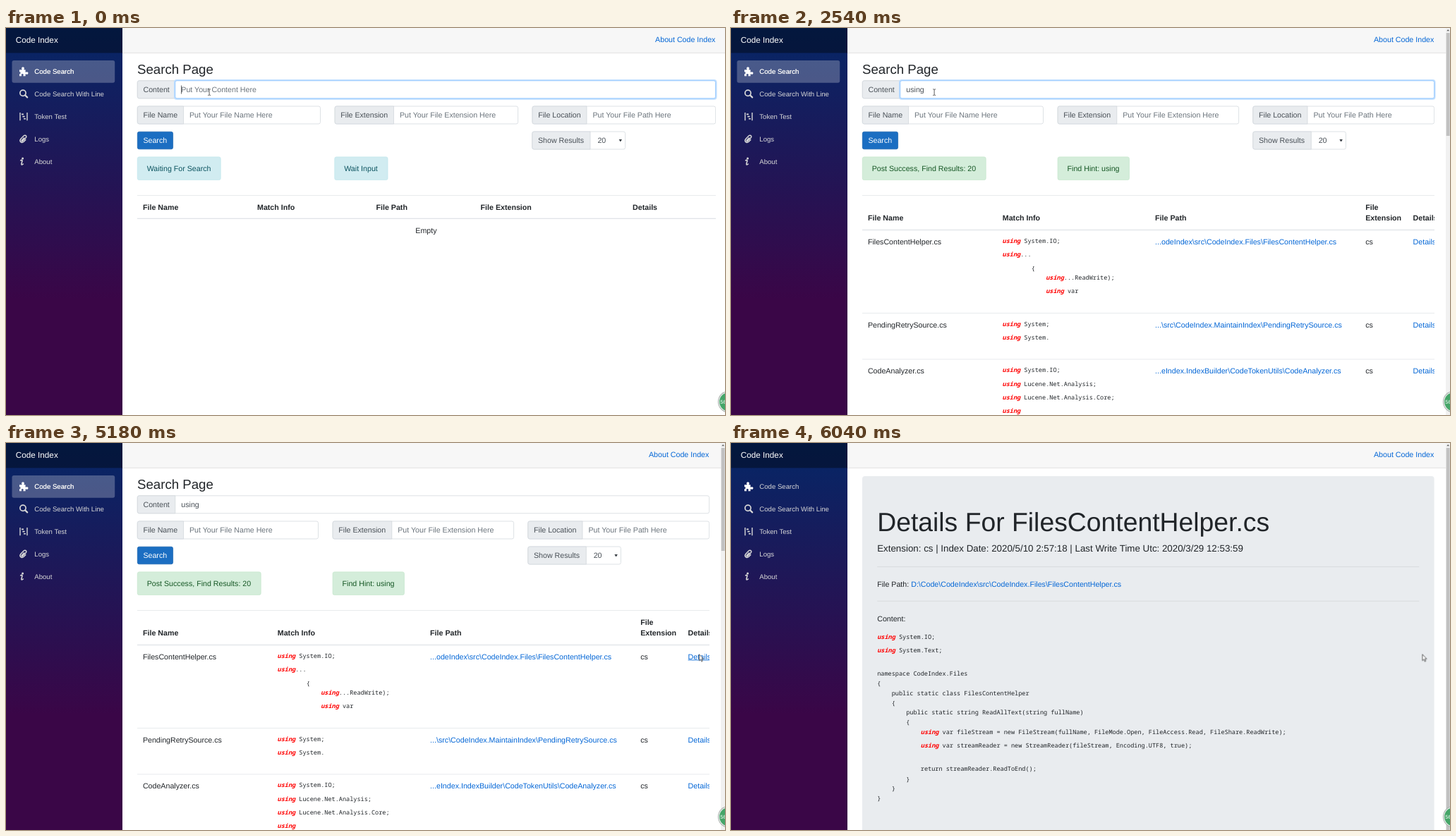
An HTML page for the animation above (7.36 s loop, 1019 by 549 pixels).

```html
<!DOCTYPE html>
<html lang="en">
<head>
<meta charset="utf-8">
<title>Code Index</title>
<style>
html, body { margin: 0; width: 100%; height: 100%; overflow: hidden; background: #fff; }
svg { display: block; width: 1019px; height: 549px; }
text { font: 10.667px "Liberation Sans", Arial, sans-serif; fill: #212529; text-rendering: geometricPrecision; white-space: pre; }
.brand { font-size: 11.73px; fill: #fff; }
.nav { font-size: 9.6px; fill: #d7d7d7; }
.h3 { font-size: 18.667px; }
.h1 { font-size: 37.333px; }
.lead { font-size: 13.333px; }
.b { font-weight: bold; }
.w { fill: #fff; }
.lab { fill: #495057; }
.ph { fill: #6c757d; }
.link { fill: #0366d6; }
.info { fill: #0c5460; }
.good { fill: #155724; }
.code { font: 8.553px "Noto Sans Mono", "DejaVu Sans Mono", monospace; }
.code tspan { font-weight: bold; font-style: italic; fill: #f00; }

.form, .results, .blank, .details, .active, .ph0, .wait, .hint, .focus, .caret, .type, .under, .beam, .arrow {
  animation: 7360ms step-end infinite;
}
.form { animation-name: form; }
.results { animation-name: results; }
.blank { animation-name: blank; }
.details { animation-name: details; }
.active { animation-name: active; }
.ph0 { animation-name: ph0; }
.wait { animation-name: wait; }
.hint { animation-name: hint; }
.focus { animation-name: focus; }
.caret { animation-name: caret; }
.type { animation-name: type; }
.under { animation-name: under; }
.beam { animation-name: beam; }
.arrow { animation-name: arrow, move; }

@keyframes form { 0% { opacity: 1 } 34.511%, 100% { opacity: 0 } }
@keyframes results { 0% { opacity: 0 } 34.511% { opacity: 1 } 71.603%, 100% { opacity: 0 } }
@keyframes blank { 0% { opacity: 0 } 71.603% { opacity: 1 } 72.69%, 100% { opacity: 0 } }
@keyframes details { 0% { opacity: 0 } 72.69%, 100% { opacity: 1 } }
@keyframes active { 0% { opacity: 1 } 71.603%, 100% { opacity: 0 } }
@keyframes ph0 { 0% { opacity: 1 } 10.19%, 100% { opacity: 0 } }
@keyframes wait { 0% { opacity: 1 } 18.886%, 100% { opacity: 0 } }
@keyframes hint { 0% { opacity: 0 } 18.886%, 100% { opacity: 1 } }
@keyframes focus { 0% { opacity: 1 } 70.38%, 100% { opacity: 0 } }
@keyframes caret {
  0%, 10.19%, 39.674%, 54.66%, 68.342% { opacity: 1 }
  7.065%, 32.473%, 47.147%, 60.87%, 70.38%, 100% { opacity: 0 }
}
@keyframes type {
  0% { transform: translateX(0) }
  10.19% { transform: translateX(5.9px) }
  14.538% { transform: translateX(11.3px) }
  16.576% { transform: translateX(13.6px) }
  18.886% { transform: translateX(19.6px) }
  25.136%, 100% { transform: translateX(25.6px) }
}
@keyframes under { 0% { opacity: 0 } 57.745%, 100% { opacity: 1 } }
@keyframes beam { 0% { opacity: 1 } 48.234%, 100% { opacity: 0 } }
@keyframes arrow { 0% { opacity: 0 } 48.234%, 100% { opacity: 1 } }
@keyframes move {
  0% { transform: translate(288px, 91px) }
  48.234% { transform: translate(309px, 104px) }
  49.3% { transform: translate(362px, 122px) }
  50.37% { transform: translate(446px, 148px) }
  51.44% { transform: translate(548px, 177px) }
  52.51% { transform: translate(654px, 206px) }
  53.58% { transform: translate(756px, 233px) }
  54.66% { transform: translate(850px, 257px) }
  55.73% { transform: translate(922px, 275px) }
  56.793% { transform: translate(970px, 286.5px) }
  57.745% { transform: translate(979px, 297px) }
  58.832% { transform: translate(982px, 299.5px) }
  72.69% { transform: translate(981.3px, 299.5px) }
  73.777% { transform: translate(979.9px, 299.5px) }
  75.815% { transform: translate(979.2px, 299.5px) }
  82.065%, 100% { transform: translate(979.5px, 299.5px) }
}
</style>
</head>
<body>
<svg id="stage" viewBox="0 0 1019 549" xmlns="http://www.w3.org/2000/svg"></svg>
<script>
const CH = 5.132;
const text = (x, y, s, cls = '') => `<text x="${x}" y="${y}" class="${cls}">${s}</text>`;
const group = (cls, ...parts) => `<g class="${cls}">${parts.join('')}</g>`;
const fill = (x, y, x2, y2, color, r = 0) =>
  `<rect x="${x}" y="${y}" width="${x2 - x}" height="${y2 - y}" rx="${r}" fill="${color}"/>`;
const box = (x, y, x2, y2, color, edge, r = 2.5) =>
  `<rect x="${x}" y="${y}" width="${x2 - x}" height="${y2 - y}" rx="${r}" fill="${color}" stroke="${edge}" stroke-width=".7"/>`;
const rule = (y, x2, h = .7, color = '#dee2e6', x = 186) => fill(x, y, x2, y + h, color);
const code = (x, y, indent, s) =>
  text((x + indent * CH).toFixed(2), y, s.replace(/^using/, '<tspan>using</tspan>'), 'code');

// Label with an input field beside it
const field = (x, mid, end, y, label, value, cls) =>
  box(x, y, end, y + 25, '#fff', '#ced4da') +
  `<path d="M${mid} ${y}H${x + 2.5}q-2.5 0-2.5 2.5v20q0 2.5 2.5 2.5H${mid}z" fill="#e9ecef" stroke="#ced4da" stroke-width=".7"/>` +
  text(x + 8.2, y + 16, label, 'lab') + text(mid + 8.4, y + 16, value, cls);

const info = (x, x2, s) => box(x, 182.9, x2, 215.6, '#d1ecf1', '#bee5eb') + text(x + 13.4, 203, s, 'info');
const good = (x, x2, s) => box(x, 182.9, x2, 215.6, '#d4edda', '#c3e6cb') + text(x + 13.4, 203, s, 'good');

const topBar = x => fill(165, 0, 1019, 35, '#f7f7f7') + fill(165, 34.9, 1019, 35.6, '#d6d5d5') +
  text(x, 20, 'About Code Index', 'link');

const scroll = end => fill(1013, 0, 1019, 549, '#f1f1f1') + fill(1013.7, 7, 1018.6, end, '#c1c1c1') +
  '<path d="M1014.3 4.3l1.9-2.2 1.9 2.2z" fill="#606060"/>';

// c: right edge, then the left, middle and end of each column
const form = c =>
  text(186, 64.5, 'Search Page', 'h3') +
  field(186.3, 239.8, c.right, 74.8, 'Content', '', 'ph') +
  group('focus',
    `<rect x="239.3" y="74.3" width="${c.right - 238.8}" height="26" rx="2.5" fill="#fff" stroke="#bfdeff" stroke-width="2.8"/>`,
    box(239.8, 74.8, c.right, 99.8, '#fff', '#80bdff')) +
  field(186.3, 251.5, c.name, 111, 'File Name', 'Put Your File Name Here', 'ph') +
  field(...c.ext, 111, 'File Extension', 'Put Your File Extension Here', 'ph') +
  field(...c.loc, 111, 'File Location', 'Put Your File Path Here', 'ph') +
  box(186.3, 147.2, 236.6, 171.8, '#1b6ec2', '#1861ac') + text(194.4, 163.2, 'Search', 'w') +
  field(...c.show, 147, 'Show Results', '', 'lab') +
  text(c.show[1] + 10.4, 163, '20', 'lab') +
  `<path d="M${c.show[2] - 9} 158h4.4l-2.2 3.4z" fill="#343a40"/>`;

const wide = { right: 1005.6, name: 445.5, ext: [466.1, 549.5, 725.6], loc: [746, 823, 1005.6], show: [745.8, 828, 877.6] };
const slim = { right: 996.6, name: 442.5, ext: [463.1, 546.8, 719.6], loc: [739.8, 817, 996.6], show: [739.8, 822.3, 871.4] };

const caret = group('caret', fill(248.3, 81.5, 249, 93.5, '#212529'));
const typed = text(248.3, 91, 'using', 'lab');

const searchPage = group('form', topBar(920.1), form(wide), typed,
  group('type', fill(248.3, 80, 278, 95, '#fff'), caret),
  text(248.3, 91, 'Put Your Content Here', 'ph ph0'),
  info(186.3, 304.2, 'Waiting For Search'),
  group('wait', info(465.8, 541, 'Wait Input')),
  group('hint', good(465.8, 567.6, 'Find Hint: using')),
  rule(237, 1006),
  [[194, 'File Name'], [356, 'Match Info'], [524.5, 'File Path'], [672.6, 'File Extension'], [888.1, 'Details']]
    .map(([x, s]) => text(x, 257.6, s, 'b')).join(''),
  rule(269.7, 1006, 1.2), text(580.3, 290.6, 'Empty'));

const row = (y, name, path) => text(193.9, y, name) + text(601.1, y, path, 'link') + text(899.2, y, 'cs') +
  text(966.6, y, 'Details', 'link');
const matches = [
  [305, 0, 'using System.IO;'], [324.4, 0, 'using...'], [343.6, 8, '{'],
  [357, 12, 'using...ReadWrite);'], [376.3, 12, 'using var'],
  [422.8, 0, 'using System;'], [442, 0, 'using System.'],
  [488.3, 0, 'using System.IO;'], [507.6, 0, 'using Lucene.Net.Analysis;'],
  [526.9, 0, 'using Lucene.Net.Analysis.Core;'], [546, 0, 'using']
];
const resultPage = group('results', topBar(911), form(slim), typed,
  `<g transform="translate(25.6)">${caret}</g>`,
  good(186.3, 361.2, 'Post Success, Find Results: 20'),
  good(463.1, 564.4, 'Find Hint: using'),
  '<g clip-path="url(#table)">',
  rule(237, 997), rule(285.9, 997, 1.2), rule(404, 997), rule(469.6, 997),
  text(194, 273.4, 'File Name', 'b'), text(384.8, 273.4, 'Match Info', 'b'), text(601.1, 273.4, 'File Path', 'b'),
  text(899.2, 257.6, 'File', 'b'), text(899.2, 273.4, 'Extension', 'b'), text(966.6, 273.4, 'Details', 'b'),
  row(306.6, 'FilesContentHelper.cs', '...odeIndex\\src\\CodeIndex.Files\\FilesContentHelper.cs'),
  row(424.6, 'PendingRetrySource.cs', '...\\src\\CodeIndex.MaintainIndex\\PendingRetrySource.cs'),
  row(490, 'CodeAnalyzer.cs', '...eIndex.IndexBuilder\\CodeTokenUtils\\CodeAnalyzer.cs'),
  group('under', rule(307.6, 1000, .8, '#0366d6', 966.6)),
  matches.map(([y, n, s]) => code(384.6, y, n, s)).join(''),
  '</g>', scroll(153));

const panel = (right, bottom, title, lead, path) =>
  fill(186, 47, right, bottom, '#e9ecef', 4) +
  text(207.2, 124.9, 'Details For ' + title, 'h1') + text(207.2, 154, lead, 'lead') +
  rule(175.3, right - 21.3, .8, '#d4d7d9', 207.2) + rule(223.8, right - 21.3, .8, '#d4d7d9', 207.2) +
  text(207.2, 203.8, 'File Path:') + text(255.2, 203.8, path, 'link') + text(207.2, 252.8, 'Content:');

const listing = [
  [277.6, 0, 'using System.IO;'], [297, 0, 'using System.Text;'],
  [330, 0, 'namespace CodeIndex.Files'], [344, 0, '{'],
  [357.6, 4, 'public static class FilesContentHelper'], [371.6, 4, '{'],
  [385.4, 8, 'public static string ReadAllText(string fullName)'], [399.3, 8, '{'],
  [413.2, 12, 'using var fileStream = new FileStream(fullName, FileMode.Open, FileAccess.Read, FileShare.ReadWrite);'],
  [432.4, 12, 'using var streamReader = new StreamReader(fileStream, Encoding.UTF8, true);'],
  [465.4, 12, 'return streamReader.ReadToEnd();'],
  [479.5, 8, '}'], [493.4, 4, '}'], [507.4, 0, '}']
];
const blankPage = group('blank', topBar(920.1),
  panel(1005.8, 334.6, '', 'Extension: | Index Date: | Last Write Time Utc:', ''));
const detailPage = group('details', topBar(911),
  panel(996.6, 560, 'FilesContentHelper.cs',
    'Extension: cs | Index Date: 2020/5/10 2:57:18 | Last Write Time Utc: 2020/3/29 12:53:59',
    'D:\\Code\\CodeIndex\\src\\CodeIndex.Files\\FilesContentHelper.cs'),
  listing.map(([y, n, s]) => code(207.2, y, n, s)).join(''), scroll(549));

const icons = `<g fill="#d7d7d7">
  <path fill="#fff" d="M19 59.3h3.4q.4-.4 0-1a1.9 1.9 0 1 1 3.2 0q-.4.6 0 1h2v3.2q.4.5 1 0a1.8 1.8 0 1 1 0 3q-.6-.4-1 0v2.7h-3q-.4-.4 0-.9a1.5 1.5 0 1 0-2.6 0q.4.5 0 .9h-3v-3q1.6.4 1.6-1.4t-1.6-1.4z"/>
  <g fill="none" stroke="#d7d7d7" stroke-width="1.7">
    <circle cx="24" cy="92.2" r="4.1"/><path d="M27 95.2l3.2 3.2" stroke-width="2.2" stroke-linecap="round"/>
    <path d="M20 120v11.3M30 120v11.3" stroke-width="1.4"/>
    <path d="M22 122.4h3M23.4 125.6h3.2M25 128.8h3" stroke-width="1.6"/>
    <path d="M26 155.5l-3.7 3.9q-.6 1.4.8 1.3l4.9-4.8q1.8-2.2-.2-3.4-1.5-.6-3 .8l-4 4.2q-1.8 2.3 0 4.2 2 1.6 4.2-.2l3.2-3.2" stroke-width="1.5"/>
    <path d="M20.3 188.3q2.2-1.7 2.7-.4.2.7-.6 2.8-1 2.9-.1 3.2.9.2 2.4-1.4" stroke-width="1.6"/>
  </g>
  <circle cx="23.6" cy="184.9" r="1.5"/></g>`;

const sidebar = fill(0, 0, 165, 549, 'url(#night)') + fill(0, 0, 165, 35.4, 'rgba(0,0,0,.4)') +
  text(13.8, 21, 'Code Index', 'brand') +
  group('active', fill(8.5, 45.9, 154.2, 77.7, 'rgba(255,255,255,.25)', 2.7)) + icons +
  ['Code Search', 'Code Search With Line', 'Token Test', 'Logs', 'About']
    .map((s, i) => text(40.3, 65.2 + i * 31.95, s, 'nav')).join('') +
  group('active', text(40.3, 65.2, 'Code Search', 'nav w'));

const badge = '<circle cx="1024.5" cy="530.3" r="15.6" fill="#a9b0ac"/>' +
  '<circle cx="1024.5" cy="530.3" r="14.6" fill="#e9efec"/><circle cx="1024.5" cy="530.3" r="13.4" fill="#45a568"/>' +
  '<text x="1012.3" y="532.6" style="font-size:7.5px;fill:#fff">56</text>';

const pointers =
  '<path class="beam" d="M286.2 86.8q1.4 0 1.9.7.5-.7 1.9-.7M288.1 87.4v7.4M286.2 95.5q1.4 0 1.9-.7.5.7 1.9.7" fill="none" stroke="#333" stroke-width=".8"/>' +
  '<path class="arrow" d="M.4.3v8.9l2-1.8 1.4 3.1 1.4-.6-1.4-3.1h2.7z" fill="#fff" stroke="#222" stroke-width=".7"/>';

document.getElementById('stage').innerHTML = `<defs>
  <linearGradient id="night" x1="0" y1="0" x2="0" y2="1">
    <stop offset="0" stop-color="#052767"/><stop offset=".7" stop-color="#3a0647"/>
  </linearGradient>
  <clipPath id="table"><rect x="165" y="230" width="831.8" height="319"/></clipPath></defs>` +
  searchPage + resultPage + blankPage + detailPage + sidebar + badge + pointers;
</script>
</body>
</html>
```
